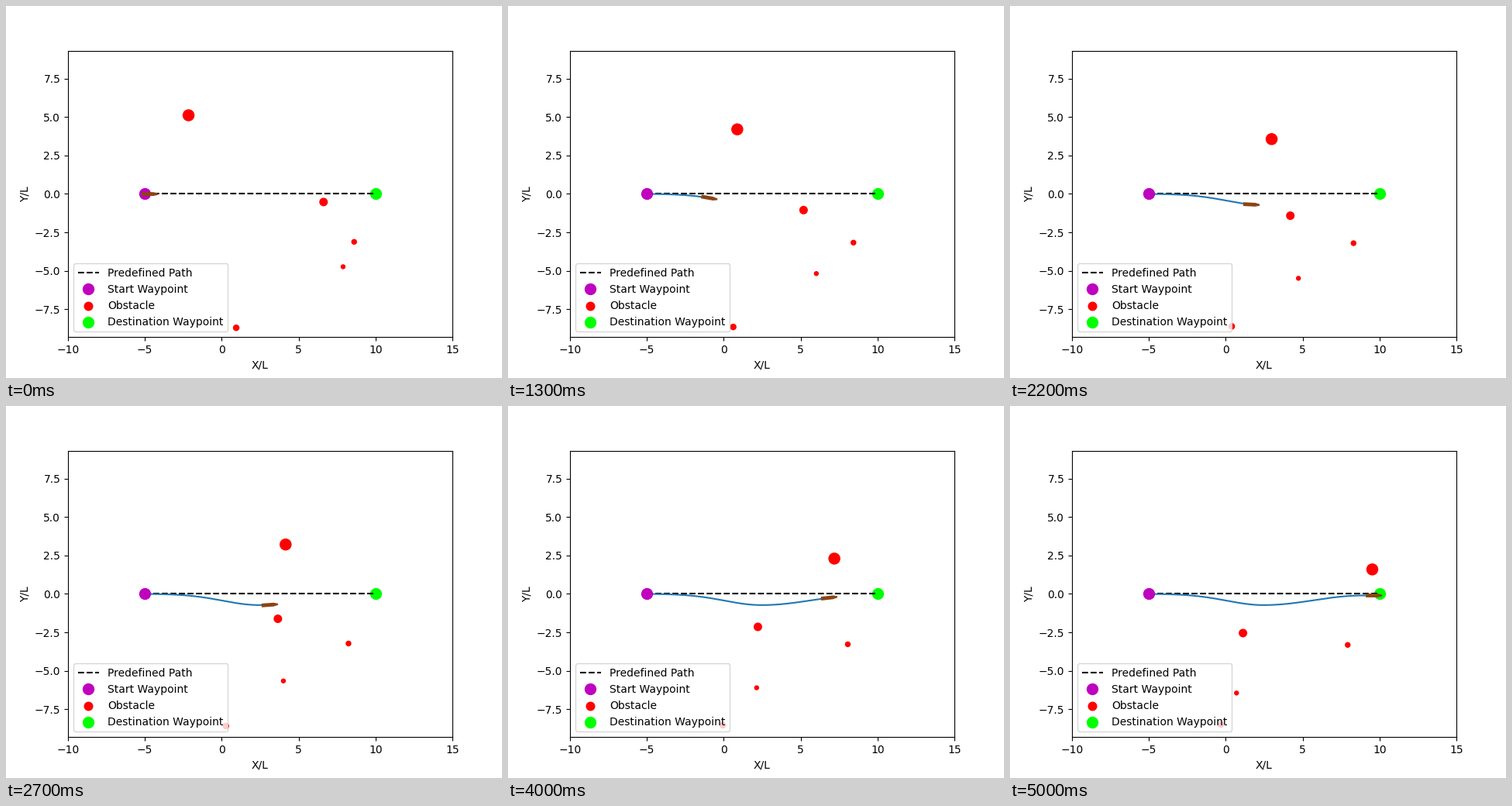
A matplotlib script for the animation above (5100 ms loop, 640 by 480 pixels).

```python
import numpy as np
import matplotlib.pyplot as plt
from matplotlib.animation import FuncAnimation

FRAMES = 51
START, GOAL = (-5, 0), (10, 0)
SHIP_FROM, SHIP_TO = -4.66, 9.66

# Each obstacle: position at the beginning, position at the end, marker area.
OBSTACLES = [
    ((-2.16, 5.11), (9.53, 1.59), 103),
    ((6.62, -0.53), (1.12, -2.55), 48),
    ((8.61, -3.12), (7.93, -3.32), 19),
    ((7.89, -4.74), (0.70, -6.45), 13),
    ((0.94, -8.71), (-0.31, -8.50), 26),
]
obst_from, obst_to, obst_size = map(np.array, zip(*OBSTACLES))

HULL = np.array([(-0.5, -0.07), (0.22, -0.07), (0.5, 0), (0.22, 0.07), (-0.5, 0.07)])


def route_y(x):
    """Evasive dip: a bell curve down to the turn, then a cosine ease back."""
    depth, rest, turn = 0.73, 0.105, 2.45
    d = np.asarray(x, float) - turn
    down = depth * np.exp(-(d / 3.38) ** 2)
    phase = np.pi * np.clip(d / 6.5, 0, 1)
    back = rest + (depth - rest) * (1 + np.cos(phase)) / 2
    return -np.where(d < 0, down, back)


def ship_x(u):
    """Nearly steady cruise that slows a little near the goal."""
    return SHIP_FROM + (SHIP_TO - SHIP_FROM) * u + 0.09 * np.sin(np.pi * u ** 2)


def hull_at(x):
    # The bow leads the track slightly into each turn.
    angle = np.arctan2(route_y(x + 0.5) - route_y(x + 0.2), 0.3)
    c, s = np.cos(angle), np.sin(angle)
    return HULL @ np.array([(c, s), (-s, c)]) + (x, route_y(x))


fig, ax = plt.subplots(figsize=(6.4, 4.8), dpi=100)
ax.plot(*zip(START, GOAL), "k--", zorder=1.8, label="Predefined Path")
ax.plot(*START, "mo", ms=10, label="Start Waypoint")
obstacles = ax.scatter(*obst_from.T, s=obst_size, c="red", label="Obstacle")
ax.scatter(*GOAL, s=100, c="lime", label="Destination Waypoint")
trail, = ax.plot([], [], color="tab:blue", zorder=1.9)
ship = ax.fill(*HULL.T, fc="saddlebrown", ec="saddlebrown", lw=1.5, zorder=3)[0]

half_height = 25 * 369.6 / 496 / 2
ax.set(xlim=(-10, 15), ylim=(-half_height, half_height), xlabel="X/L", ylabel="Y/L")
ax.legend(loc="lower left")


def update(n):
    u = n / (FRAMES - 1)
    x = ship_x(u)
    obstacles.set_offsets(obst_from + (obst_to - obst_from) * u)
    xs = np.linspace(SHIP_FROM, x, 150)
    trail.set_data(xs, route_y(xs))
    ship.set_xy(hull_at(x))
    return obstacles, trail, ship


anim = FuncAnimation(fig, update, frames=FRAMES, interval=100, repeat=True, repeat_delay=0)
plt.show()
```
